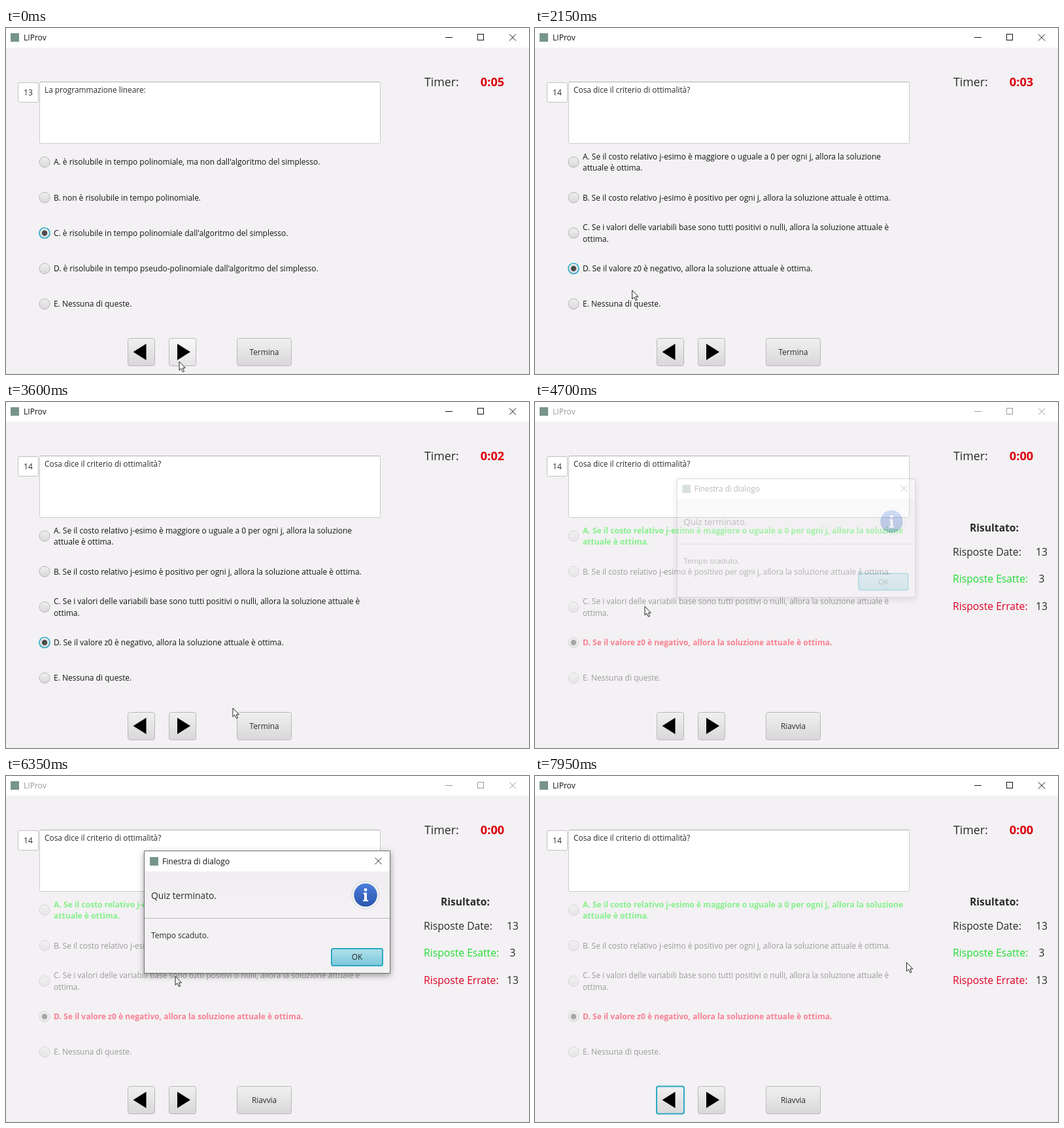
These frames come from a looping animation (800 px wide and 529 px high, 8 s). An HTML page:

```html
<!DOCTYPE html>
<html lang="it">
<head>
<meta charset="utf-8">
<title>LIProv</title>
<style>
  html, body { margin: 0; width: 100%; height: 100%; overflow: hidden; background: #f3f1f3; }
  svg { display: block; width: 800px; height: 529px; font-family: "Open Sans", "Noto Sans", sans-serif; }
  text { white-space: pre; }
</style>
</head>
<body>
<svg id="stage" viewBox="0 0 800 529"></svg>
<script>
const LOOP = 8000;
const NEXT_CLICK = 1000, PICK = 1980, EXPIRED = 4640, DIALOG_CLOSE = 7750;
const FIRST_TICK = 640;
const TEAL = '#2aa9c4', INK = '#2b2b2b', GREY = '#9b9a9b', GREEN = '#86f08c', RED = '#f98092';

// Markup helpers
const text = (x, y, size, str, attrs = '') => `<text x="${x}" y="${y}" font-size="${size}" ${attrs}>${str}</text>`;
const rect = (x, y, w, h, attrs) => `<rect x="${x}" y="${y}" width="${w}" height="${h}" ${attrs}/>`;
const gradient = (id, top, bottom) =>
  `<linearGradient id="${id}" x2="0" y2="1"><stop stop-color="${top}"/><stop offset="1" stop-color="${bottom}"/></linearGradient>`;
const cross = (x, y, size) => `<path d="M${x} ${y}l${size} ${size}m0 ${-size}l${-size} ${size}"/>`;
const button = (id, x, w) => rect(x, 474.5, w, 42, `id="${id}" rx="3" stroke="#b9b7b9"`);
const focusRing = (id, x) =>
  rect(x, 474.5, 42, 42, `id="${id}" rx="3" fill="none" stroke="${TEAL}" stroke-width="2"`);

const question13 = [
  ["A. è risolubile in tempo polinomiale, ma non dall'algoritmo del simplesso."],
  ['B. non è risolubile in tempo polinomiale.'],
  ["C. è risolubile in tempo polinomiale dall'algoritmo del simplesso."],
  ["D. è risolubile in tempo pseudo-polinomiale dall'algoritmo del simplesso."],
  ['E. Nessuna di queste.']
];
const question14 = [
  ['A. Se il costo relativo j-esimo è maggiore o uguale a 0 per ogni j, allora la soluzione', 'attuale è ottima.'],
  ['B. Se il costo relativo j-esimo è positivo per ogni j, allora la soluzione attuale è ottima.'],
  ['C. Se i valori delle variabili base sono tutti positivi o nulli, allora la soluzione attuale è', 'ottima.'],
  ['D. Se il valore z0 è negativo, allora la soluzione attuale è ottima.'],
  ['E. Nessuna di queste.']
];

const rowY = i => 205 + 54.25 * i;

function radio(i, selected, disabled) {
  const focused = selected && !disabled;
  return `<g opacity="${disabled ? 0.45 : 1}">
    ${focused ? `<circle cx="59" cy="${rowY(i)}" r="9" fill="#a9dfea"/>` : ''}
    <circle cx="59" cy="${rowY(i)}" r="8" fill="url(#btn)" stroke="${focused ? '#35b0ca' : '#b7b5b7'}" stroke-width="${focused ? 1.7 : 1}"/>
    ${selected ? `<circle cx="59" cy="${rowY(i)}" r="4.2" fill="#4c4c4c"/>` : ''}</g>`;
}

function options(rows, selected, disabled) {
  return rows.map((lines, i) => {
    const verdict = disabled && (i === 0 ? GREEN : i === 3 ? RED : null);
    const style = `fill="${verdict || (disabled ? GREY : '#141414')}" ${verdict ? 'font-weight="700"' : ''}`;
    const base = rowY(i) + 4.4 - (lines.length - 1) * 8.9;
    return radio(i, i === selected, disabled) +
      lines.map((line, n) => text(73, base + n * 17.7, verdict ? 12.05 : 11.97, line, style)).join('');
  }).join('');
}

const score = (y, label, value, color) =>
  text(639, y, 15.7, label, `fill="${color}"`) +
  text(775, y, 15.7, value, `fill="${INK}" text-anchor="middle"`);

const appIcon = (x, y) => rect(x, y, 13, 13, 'fill="#789589"');

document.getElementById('stage').innerHTML = `
<defs>
  ${gradient('btn', '#f1f0f1', '#d9d7d9')}
  ${gradient('btnHover', '#f9f8f9', '#e6e4e6')}
  ${gradient('okFill', '#b3e2ec', '#79c6d8')}
  ${gradient('okHover', '#cdeef5', '#a3d9e5')}
  ${gradient('header', '#efedef', '#f4f2f4')}
  ${gradient('info', '#4a7ddb', '#2a55ad')}
  <filter id="shadow" x="-10%" y="-10%" width="120%" height="130%">
    <feDropShadow dx="0" dy="3" stdDeviation="5" flood-opacity=".38"/>
  </filter>
</defs>
${rect(0, 0, 800, 529, 'fill="#f3f1f3"')}
${rect(0, 0, 800, 30, 'fill="#fff"')}
${appIcon(7, 8)}
<g id="titleBar">
  ${text(27, 19, 12.1, 'LIProv', 'fill="currentColor"')}
  <g fill="none" stroke="currentColor"><path d="M672 14.5h11"/>${rect(721.5, 9.5, 9, 9, '')}${cross(770, 9.5, 10)}</g>
</g>

${rect(51.5, 82.5, 521, 94, 'rx="2" fill="#fff" stroke="#cccacc"')}
<path d="M52 82.5h520" stroke="#b2b0b2"/>
${rect(18.5, 83.5, 31, 30, 'rx="2" fill="#fff" stroke="#c3c1c3"')}
${text(34, 102.7, 12.1, '', `id="number" fill="${INK}" text-anchor="middle"`)}
${text(59, 99.3, 11.85, '', `id="question" fill="${INK}"`)}
${text(640, 89, 17.8, 'Timer:', `fill="${INK}"`)}
${text(744, 89, 18.2, '', 'id="timer" fill="#de000c" font-weight="700" text-anchor="middle"')}

<g id="q13">${options(question13, 2, false)}</g>
<g id="q14">${options(question14, -1, false)}</g>
<g id="q14picked">${options(question14, 3, false)}</g>
<g id="results">
  ${options(question14, 3, true)}
  ${text(702.5, 197.5, 15.6, 'Risultato:', `fill="${INK}" font-weight="700" text-anchor="middle"`)}
  ${score(234.5, 'Risposte Date:', 13, INK)}
  ${score(276.3, 'Risposte Esatte:', 3, '#22dc35')}
  ${score(318, 'Risposte Errate:', 13, '#e00025')}
</g>

${button('prev', 186.5, 41)}${button('next', 249.5, 41)}${button('end', 353.5, 83)}
${focusRing('prevFocus', 186)}${focusRing('nextFocus', 249)}
<path d="M194.500 495.300l20-12.500v25zM282 495.300l-20-12.500v25z"/>
${text(395, 499.8, 11.8, '', `id="endLabel" fill="${INK}" text-anchor="middle"`)}

<g id="dialog">
  ${rect(211, 114, 377, 188, 'fill="#f3f1f3" filter="url(#shadow)"')}
  ${rect(211, 114, 377, 32, 'fill="#fff"')}
  ${rect(211, 146, 377, 71, 'fill="url(#header)"')}
  <path d="M211 217.5h377" stroke="#b9b8b9"/>
  ${rect(211.5, 114.5, 376, 187, 'fill="none" stroke="#747374"')}
  ${appIcon(220, 124)}
  ${text(239, 135, 12.1, 'Finestra di dialogo', 'fill="#111"')}
  <g fill="none" stroke="#222">${cross(564.5, 125, 10)}</g>
  ${text(222, 187.5, 13.75, 'Quiz terminato.', `fill="${INK}"`)}
  ${text(222, 247.8, 11.9, 'Tempo scaduto.', `fill="${INK}"`)}
  <circle cx="550" cy="182" r="21" fill="#f5f5f5" stroke="#d3d3d6"/>
  <circle cx="550" cy="182" r="17.8" fill="url(#info)"/>
  <circle cx="550" cy="174" r="2.4" fill="#fff"/>
  <path d="M546.5 178.5h5.5v11h2v2h-8v-2h2v-9h-1.5z" fill="#fff"/>
  ${rect(498, 264, 78, 26, `id="ok" rx="2.5" stroke="${TEAL}" stroke-width="2"`)}
  ${text(537, 281.3, 11.8, 'OK', `fill="${INK}" text-anchor="middle"`)}
</g>
<path id="cursor" d="M0 0V13.4L3 10.6L5.4 15.8L7.5 14.9L5.3 9.8H9.4Z" fill="#fff" stroke="#222" stroke-linejoin="round"/>`;

const el = Object.fromEntries([...document.querySelectorAll('#stage [id]')].map(node => [node.id, node]));

// Pointer stops: time, x, y
const pointerPath = [
  [0, 265, 510], [800, 265, 510], [1000, 265, 505], [1700, 265, 503], [1950, 62, 367],
  [2050, 66, 368], [2357, 392, 498], [3400, 389, 498], [3600, 347, 468], [3900, 168, 312.5],
  [6150, 168, 312.5], [6800, 568, 285], [LOOP, 568.5, 285]
];

const clamp = v => Math.max(0, Math.min(1, v));
const smooth = u => u * u * (3 - 2 * u);

function pointerAt(t) {
  const i = pointerPath.findIndex(stop => stop[0] > t);
  const [t0, x0, y0] = pointerPath[i - 1], [t1, x1, y1] = pointerPath[i];
  const u = smooth((t - t0) / (t1 - t0));
  return [x0 + (x1 - x0) * u, y0 + (y1 - y0) * u];
}

const show = (node, visible) => node.setAttribute('display', visible ? 'inline' : 'none');

function paintButton(node, px, py, fill, hoverFill) {
  const { x, y, width, height } = node.getBBox();
  const hover = px >= x && px <= x + width && py >= y && py <= y + height;
  node.setAttribute('fill', `url(#${hover ? hoverFill : fill})`);
}

function render(t) {
  const second = t >= NEXT_CLICK, picked = t >= PICK, expired = t >= EXPIRED;
  const closed = t >= DIALOG_CLOSE, modal = expired && !closed;
  show(el.q13, !second);
  show(el.q14, second && !picked);
  show(el.q14picked, picked && !expired);
  show(el.results, expired);
  show(el.nextFocus, second && !picked);
  show(el.prevFocus, closed);

  el.number.textContent = second ? 14 : 13;
  el.question.textContent = second ? 'Cosa dice il criterio di ottimalità?' : 'La programmazione lineare:';
  const ticks = Math.floor((t - FIRST_TICK) / 1000) + 1;
  el.timer.textContent = '0:0' + Math.max(0, 5 - ticks);
  el.endLabel.textContent = expired ? 'Riavvia' : 'Termina';
  el.titleBar.setAttribute('color', modal ? '#9a9a9a' : '#111');

  const opening = clamp((t - EXPIRED) / 220), closing = clamp((t - DIALOG_CLOSE) / 150);
  const scale = 0.92 + 0.08 * (1 - (1 - opening) ** 3) - 0.08 * closing;
  show(el.dialog, opening > 0 && closing < 1);
  el.dialog.setAttribute('opacity', opening * (1 - closing));
  el.dialog.setAttribute('transform', `translate(399.5 208) scale(${scale}) translate(-399.5 -208)`);

  const [x, y] = pointerAt(t);
  for (const node of [el.prev, el.next, el.end]) paintButton(node, x, y, 'btn', 'btnHover');
  paintButton(el.ok, x, y, 'okFill', 'okHover');
  el.cursor.setAttribute('transform', `translate(${x} ${y})`);
}

const start = performance.now();
function frame() {
  render((performance.now() - start) % LOOP);
  requestAnimationFrame(frame);
}
frame();
</script>
</body>
</html>
```
